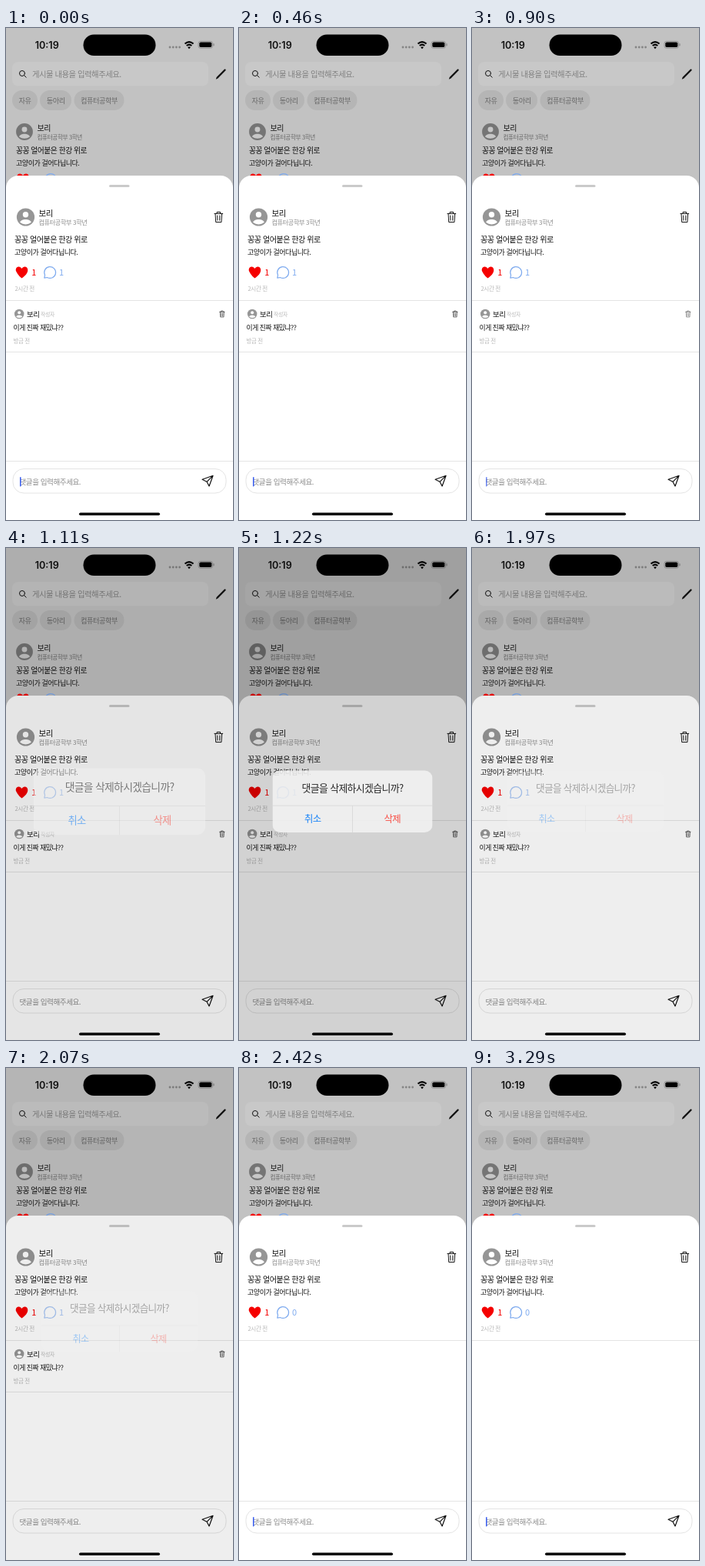
Recreate the animation shown at these times as an HTML page. Size 295 px wide and 640 px high, loop 3.61 s.

```html
<!DOCTYPE html>
<html lang="ko">
<head>
<meta charset="utf-8">
<title>댓글 삭제</title>
<style>
html, body { margin: 0; width: 100%; height: 100%; overflow: hidden; background: #fff; }
svg { display: block; width: 100%; height: 100%; }
text { font-family: "Noto Sans CJK KR", "Noto Sans CJK", sans-serif; letter-spacing: -.05em; fill: #111; }
.b { font-weight: 500; }
.mid { text-anchor: middle; }
.g1 { fill: #666; }
.g2 { fill: #8c8c8c; }
.g3 { fill: #b8b8b8; }
.hint { fill: #808080; }
.red { fill: #f50000; }
.blue { fill: #7fabef; }
.cancel { fill: #007aff; }
.delete { fill: #ff3b30; }
.clock { font: 600 12.6px Inter, sans-serif; letter-spacing: 0; }
.line { fill: none; stroke: #111; stroke-linecap: round; stroke-linejoin: round; }
.rule { stroke: #e4e4e4; }
</style>
</head>
<body>
<svg viewBox="0 0 295 640">
  <defs>
    <g id="avatar">
      <circle r="11.6" fill="#969696"/>
      <circle cy="-3.2" r="3.7" fill="#fff"/>
      <path d="M-7.4 6.8C-6 1.6 6 1.6 7.4 6.8Q4 9.4 0 9.4T-7.4 6.8Z" fill="#fff"/>
    </g>
    <path id="trash" class="line" d="M-5.4-4.6H5.4M-2.2-4.8V-6.6H2.2V-4.8M-4.3-4.4-3.6 6.6H3.6L4.3-4.4M-1.6-2-1.4 4.2M1.6-2 1.4 4.2"/>
    <path id="heart" d="M0 7.6C-4 4.8-8-1.4-7.8-3.4C-7.6-8.2-2-9 0-4.9C2-9 7.6-8.2 7.8-3.4C8 1.4 4 4.8 0 7.6Z"/>
    <path id="bubble" d="M-7.2 7.2-6.4 3.4A7.4 7.4 0 1 1-3.4 6.5Z" fill="none" stroke="#7fabef" stroke-width="1.2" stroke-linejoin="round"/>
    <clipPath id="alertShape"><rect x="46" y="290.5" width="203" height="78.5" rx="10"/></clipPath>
  </defs>

  <!-- Feed behind the sheet -->
  <rect width="295" height="640" fill="#c2c2c2"/>
  <rect x="8" y="44" width="255" height="31.5" rx="8" fill="#c8c8c8"/>
  <path d="M24.5 59A3.5 3.5 0 1 1 17.5 59A3.5 3.5 0 1 1 24.5 59M23.6 61.6 26.2 64.2" class="line"/>
  <text x="34" y="63.5" font-size="10.4" class="hint">게시물 내용을 입력해주세요.</text>
  <path d="M272.8 66.8 273.6 64 284 53.6Q285.6 53 285.7 54.9L275.4 65.4Z" fill="#111"/>
  <g fill="#b5b5b5">
    <rect x="8" y="81" width="33" height="26" rx="13"/>
    <rect x="44" y="81" width="41" height="26" rx="13"/>
    <rect x="88.5" y="81" width="65" height="26" rx="13"/>
  </g>
  <g class="mid" font-size="9.2">
    <text x="24.5" y="97.5" class="g1">자유</text>
    <text x="64.7" y="97.5" class="g1">동아리</text>
    <text x="121" y="97.5" class="g1">컴퓨터공학부</text>
  </g>
  <g transform="translate(24 135) scale(.94)">
    <use href="#avatar"/><circle r="11.6" opacity=".22"/>
  </g>
  <text x="40.5" y="134" font-size="10" class="b">보리</text>
  <text x="40.5" y="144.5" font-size="7.6" class="g1">컴퓨터공학부 3학년</text>
  <text x="13" y="163.3" font-size="9.8" class="b">꽁꽁 얼어붙은 한강 위로</text>
  <text x="13" y="179" font-size="9">고양이가 걸어다닙니다.</text>
  <use href="#heart" x="22" y="197" class="red"/>
  <use href="#bubble" x="58" y="197"/>

  <!-- Status bar -->
  <text x="37.7" y="26.5" class="clock">10:19</text>
  <rect x="100.5" y="8.5" width="94" height="27.5" rx="13.7"/>
  <path d="M213 25H226" stroke="#858585" stroke-width="2.8" stroke-linecap="round" stroke-dasharray="0 4.2"/>
  <path d="M232.5 20.6Q238 15.6 243.5 20.6M234.7 23.1Q238 20.2 241.3 23.1" fill="none" stroke="#000" stroke-width="2"/>
  <path d="M236.1 25.1Q238 23.6 239.9 25.1L238 27.2Z"/>
  <rect x="250" y="17.3" width="18.5" height="9" rx="2.8" fill="none" stroke="#888" stroke-width=".8"/>
  <rect x="251.3" y="18.6" width="16" height="6.4" rx="1.7"/>
  <path d="M270 20.3V23.3" stroke="#888" stroke-width="1.2"/>

  <!-- Comment sheet -->
  <path d="M0 640V208A16 16 0 0 1 16 192H279A16 16 0 0 1 295 208V640Z" fill="#fff"/>
  <rect x="134" y="204" width="26.5" height="3" rx="1.5" fill="#cacaca"/>
  <use href="#avatar" x="25.5" y="246"/>
  <text x="42.5" y="244.5" font-size="10.5" class="b">보리</text>
  <text x="42.5" y="256.3" font-size="8.2" class="g2">컴퓨터공학부 3학년</text>
  <use href="#trash" x="276.3" y="246"/>
  <text x="11" y="279" font-size="10.1" class="b">꽁꽁 얼어붙은 한강 위로</text>
  <text x="11" y="295.3" font-size="9">고양이가 걸어다닙니다.</text>
  <use href="#heart" x="20.5" y="318" class="red"/>
  <text x="33.3" y="321.8" font-size="11" class="b red">1</text>
  <use href="#bubble" x="57" y="318"/>
  <text id="count" x="69" y="321.8" font-size="11" class="b blue">1</text>
  <text x="11.5" y="342" font-size="7.6" class="g3">2시간 전</text>
  <path d="M0 354.5H295M0 563.5H295" class="rule"/>

  <g id="comment">
    <use href="#avatar" transform="translate(17.2 372) scale(.54)"/>
    <text x="27" y="375.5" font-size="9.4" class="b">보리</text>
    <text x="45" y="374.5" font-size="6.9" class="g3">작성자</text>
    <use id="remove" href="#trash" transform="translate(280.8 372) scale(.6)"/>
    <text x="9.5" y="393.3" font-size="8.8">이게 진짜 재밌냐??</text>
    <text x="9.5" y="410" font-size="7.5" class="g3">방금 전</text>
    <path d="M0 421.5H295" class="rule"/>
  </g>

  <rect x="9" y="573.5" width="277" height="31.5" rx="14" fill="#fff" stroke="#e4e4e4"/>
  <text x="17.5" y="594" font-size="9.6" class="g2">댓글을 입력해주세요.</text>
  <rect id="caret" x="18" y="584" width="1.6" height="12.5" rx=".8" fill="#3f62f0"/>
  <path d="M255 587.3 269 582.3 264 596 261 590.3ZM261 590.3 268.6 582.6" class="line" stroke-width="1.2"/>

  <!-- Alert -->
  <rect id="dim" width="295" height="640"/>
  <rect x="95" y="630.5" width="105" height="3.5" rx="1.7"/>
  <g id="alert">
    <g clip-path="url(#alertShape)">
      <rect x="46" y="290" width="203" height="80" fill="#f2f2f2"/>
      <rect id="pressed" x="148" y="335" width="101" height="35" fill="#dedede"/>
      <path d="M46 335H249M147.5 335V370" stroke="#d4d4d4" stroke-width=".7"/>
    </g>
    <g class="mid">
      <text x="147.5" y="317" font-size="12.6" class="b">댓글을 삭제하시겠습니까?</text>
      <text x="97" y="356.5" font-size="12.1" class="cancel">취소</text>
      <text x="198" y="356.5" font-size="12.1" class="delete">삭제</text>
    </g>
  </g>
</svg>
<script>
const LOOP = 3610, OPEN = 1110, CLOSE = 1860, CLOSED = 2300, TICK = 107;
const $ = id => document.getElementById(id);
const between = (t, a, b) => t >= a && t < b;
const show = (id, opacity) => $(id).setAttribute('opacity', opacity);
const ticks = (t, start) => Math.floor((t - start) / TICK);

function presence(t) {
  if (!between(t, OPEN, CLOSED)) return 0;
  return t < CLOSE ? 1 - .5 * .25 ** Math.min(ticks(t, OPEN), 3) : .33 ** ticks(t, CLOSE);
}

function caretOpacity(t) {
  if (between(t, OPEN, CLOSED)) return 0;
  if (between(t, 340, 460) || between(t, 3170, 3290)) return 0;
  return between(t, 100, 340) || between(t, 900, OPEN) || between(t, 2930, 3170) ? .75 : 1;
}

function draw(now) {
  const t = now % LOOP, p = presence(t);
  const scale = t < CLOSE ? 1 + .2 * (1 - p) : 1;
  const deleted = t >= 2420;
  show('dim', .2 * p);
  show('alert', p);
  $('alert').setAttribute('transform', `translate(147.5 330) scale(${scale}) translate(-147.5 -330)`);
  show('pressed', +between(t, 1690, CLOSE));
  show('remove', between(t, 900, OPEN) ? .7 : 1);
  show('comment', +!deleted);
  $('count').textContent = +!deleted;
  show('caret', caretOpacity(t));
}

const start = performance.now();
(function loop() {
  draw(performance.now() - start);
  requestAnimationFrame(loop);
})();
</script>
</body>
</html>
```
